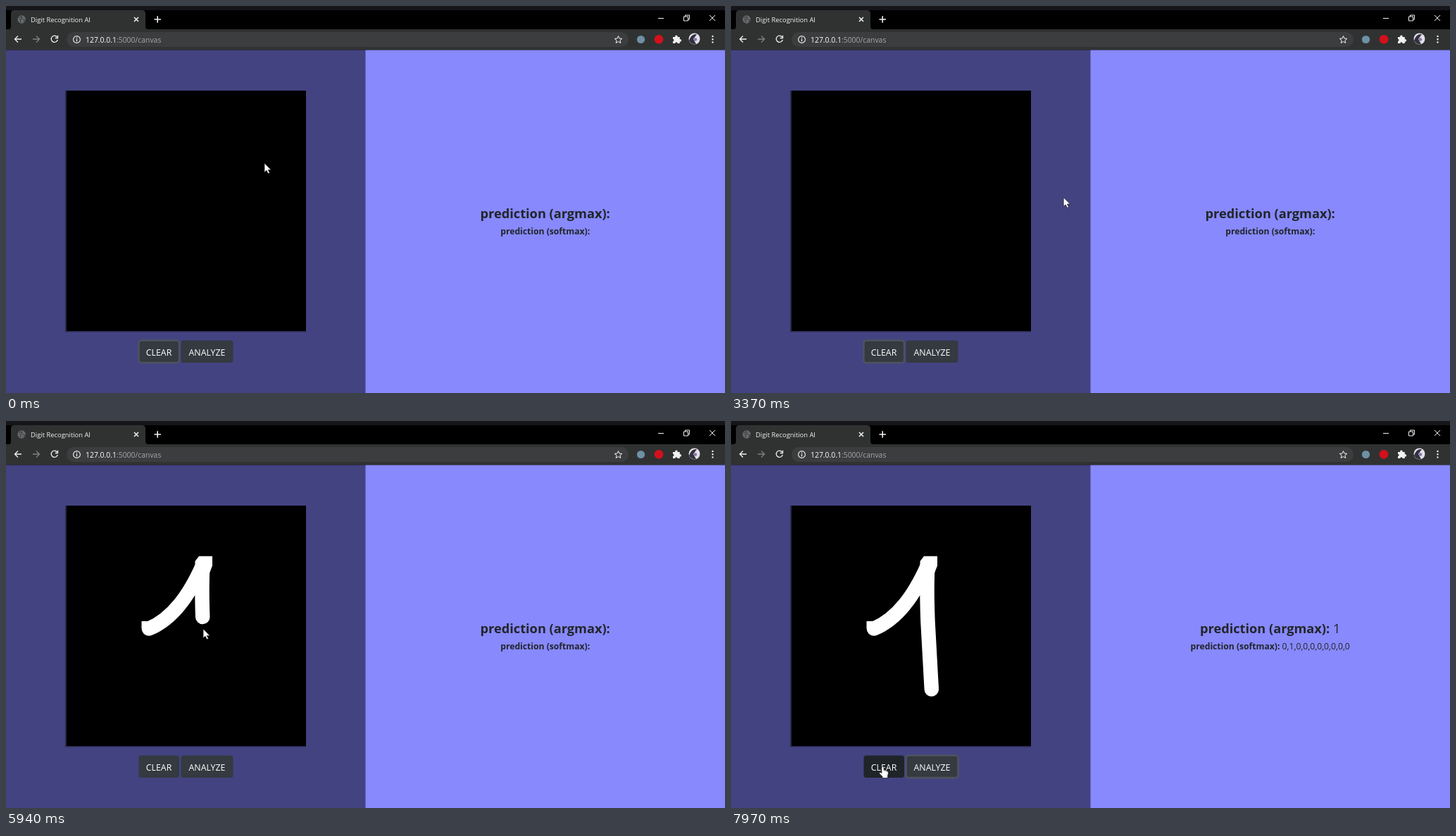
An HTML page for the animation above (8 s loop, 1021 px wide and 549 px high).

```html
<!DOCTYPE html>
<html lang="en">
<head>
<meta charset="utf-8">
<title>Digit Recognition AI</title>
<style>
  html, body { margin: 0; width: 100%; height: 100%; overflow: hidden; background: #434382; }
  svg { display: block; font-family: "Open Sans", "Noto Sans", sans-serif; }
  .icon { fill: none; stroke: #f1f1f1; stroke-width: 1.3; }
  .dim { stroke: #7d8083; }
  .ink { fill: none; stroke: #fff; stroke-width: 20.5; stroke-linecap: round; stroke-linejoin: round; }
  .button rect { fill: #343a40; stroke: #52585d; stroke-opacity: 0; stroke-width: 2.5; }
  .button.hover rect { fill: #1f2428; }
  .button.focus rect { stroke-opacity: .85; }
  .button text { fill: #fff; font-size: 12.4px; text-anchor: middle; }
  .result { fill: #212529; font-weight: 700; text-anchor: middle; }
  .result tspan { font-weight: 400; }
</style>
</head>
<body>
<svg width="1021" height="549" viewBox="0 0 1021 549">
  <!-- Window frame and toolbar -->
  <rect width="1021" height="63" fill="#000"/>
  <rect width="1021" height="6" fill="#15151a"/>
  <path d="M4 33Q7 33 7 29V11Q7 6 12 6H193Q198 6 198 11V29Q198 33 202 33Z" fill="#303232"/>
  <rect y="33" width="1021" height="29.5" fill="#303232"/>
  <rect x="86" y="37" width="798" height="21" rx="10.5" fill="#3b3d3e"/>
  <circle cx="22.2" cy="19" r="5.7" fill="#686b6d"/>
  <path d="M18 17l4-2 1 3-3 1 1 4M24 19l3 1-2 3" class="icon" style="stroke:#404344"/>
  <text x="35" y="22.5" font-size="9.4" fill="#f1f1f1">Digit Recognition AI</text>
  <text x="113" y="51.6" font-size="10.4" fill="#fff">127.0.0.1<tspan fill="#a5a8aa">:5000/canvas</tspan></text>
  <g class="icon">
    <path d="M182 16l6 6m0-6l-6 6M210.500 19h9.500M215.200 14.300v9.500" stroke-width="1.600"/>
    <path d="M926 17.500h8M999 13l8 8m0-8l-8 8M962.500 15h6v6h-6ZM964.500 15v-2h6v6h-2" stroke-width="1"/>
    <path d="M22 47H12.500M17 42.500L12.500 47l4.500 4.500"/>
    <path d="M38 47h9.500M43 42.500l4.500 4.500-4.500 4.500" class="dim"/>
    <path d="M72.500 44A4.600 4.600 0 1 0 73.300 48M73.500 41.800v3.700h-3.700"/>
    <circle cx="100.500" cy="47.500" r="4.900" stroke-width="1.100"/>
    <path d="M100.500 46.800v3.400M100.500 44.500v1.200"/>
    <path d="M869.500 42.500l1.500 3.500 3.800.3-2.900 2.500.9 3.700-3.300-2-3.300 2 .9-3.700-2.900-2.500 3.800-.3Z" stroke-width="1"/>
  </g>
  <circle cx="901.500" cy="47.500" r="5.600" fill="#6e91a6"/>
  <circle cx="927" cy="47.300" r="6.300" fill="#d4101c"/>
  <path d="M947 44h3.200a1.800 1.800 0 1 1 3.400 0h3.200v3.200a1.800 1.800 0 1 1 0 3.400v2.400h-3.200a1.600 1.600 0 1 0-3.400 0H947v-3.100a1.600 1.600 0 1 0 0-3.200Z" fill="#f1f1f1"/>
  <circle cx="977.500" cy="46.500" r="8" fill="#e2e0e8"/>
  <path d="M970 49Q973 39 981 40L976 47 980 54Q972 55 970 49Z" fill="#33303f"/>
  <circle cx="979" cy="47.500" r="2.200" fill="#8774a8"/>
  <path d="M1003.500 43v.01M1003.500 47.200v.01M1003.500 51.400v.01" class="icon" stroke-linecap="round" style="stroke-width:2.400"/>

  <!-- Page -->
  <rect y="62.500" width="510.500" height="487" fill="#434382"/>
  <rect x="510.500" y="62.500" width="511" height="487" fill="#8789fd"/>
  <rect x="84" y="120" width="342" height="342.500" fill="#29294f"/>
  <rect x="86" y="120" width="340" height="341" fill="#000"/>
  <g id="flick">
    <path d="M192.500 284h10v10h-10Z" fill="#fff"/>
    <path id="rise" class="ink" pathLength="1" d="M203 294.500Q248 276 279.500 204"/>
  </g>
  <g id="stem">
    <path d="M268.500 204v-5l5.500-7.200h19v13.500l-5 13Z" fill="#fff"/>
    <path id="fall" class="ink" pathLength="1" d="M279.500 204Q277.500 235 279.500 285L284.800 380.500"/>
  </g>
  <g id="clear" class="button">
    <rect x="188.500" y="474.500" width="57.500" height="31.500" rx="3.500"/>
    <text x="217" y="495.600">CLEAR</text>
  </g>
  <g id="analyze" class="button">
    <rect x="248.500" y="474.500" width="74" height="31.500" rx="3.500"/>
    <text x="285.500" y="495.600">ANALYZE</text>
  </g>
  <text class="result" x="765.700" y="300.500" font-size="18.200">prediction (argmax): <tspan id="argmax"></tspan></text>
  <text class="result" x="765.700" y="323.700" font-size="12.150">prediction (softmax): <tspan id="softmax"></tspan></text>

  <g id="cursor" fill="#fff" stroke="#16161c" stroke-width=".7" stroke-linejoin="round">
    <path id="arrow" d="M0 0V13L3 10.300 5.200 14.800 7.400 13.800 5.300 9.500H9.400Z"/>
    <path id="hand" d="M-1.600 1.200Q0-1 1.600 1.200V5.500L6 6.500Q8 7 8 9L7 13.500V16.500H-.5V14.500L-4.800 10Q-5 7.800-3 8.500L-1.600 9.800Z"/>
  </g>
</svg>
<script>
  const $ = id => document.getElementById(id);
  const LOOP = 8000, INK_LAG = 70, SHOW_RESULT = 7270, CLICK = 7200;
  const RISE = [5080, 5500], FALL = [5560, 6300];
  const clamp = v => Math.max(0, Math.min(1, v));
  const progress = (t, [from, to]) => clamp((t - from) / (to - from));

  // Pointer stops: time, x, y
  const stops = [
    [0, 367, 223], [2950, 367, 223], [3750, 562, 313], [4080, 562, 313],
    [4750, 207, 300], [4960, 207, 300], [5080, 203, 294.5],
    [6300, 284.8, 380.5], [6450, 286, 388], [6850, 293.5, 494],
    [7400, 293.5, 494], [7800, 215.5, 490], [8000, 215.5, 490]
  ];

  function along(path, p) {
    const point = path.getPointAtLength(path.getTotalLength() * p);
    return [point.x, point.y];
  }

  function pointer(t) {
    if (t >= RISE[0] && t < FALL[0]) return along($('rise'), progress(t, RISE));
    if (t >= FALL[0] && t < FALL[1]) return along($('fall'), progress(t, FALL));
    const i = stops.findIndex(s => s[0] > t);
    const [t0, x0, y0] = stops[i - 1], [t1, x1, y1] = stops[i];
    const p = progress(t, [t0, t1]), e = p * p * (3 - 2 * p);
    return [x0 + (x1 - x0) * e, y0 + (y1 - y0) * e];
  }

  function drawInk(group, path, t, span) {
    $(group).style.display = t < span[0] ? 'none' : '';
    $(path).setAttribute('stroke-dasharray', progress(t, span) + ' 2');
  }

  function drawButton(id, hover, focus) {
    $(id).classList.toggle('hover', hover);
    $(id).classList.toggle('focus', focus);
  }

  function draw(t) {
    const [x, y] = pointer(t);
    const overRow = y > 474 && y < 506;
    const overClear = overRow && x > 188 && x < 246;
    const overAnalyze = overRow && x > 248 && x < 322;
    const overButton = overClear || overAnalyze;

    drawInk('flick', 'rise', t - INK_LAG, RISE);
    drawInk('stem', 'fall', t - INK_LAG, FALL);
    drawButton('clear', overClear, t < RISE[0]);
    drawButton('analyze', overAnalyze, t >= CLICK);

    const done = t >= SHOW_RESULT;
    $('argmax').textContent = done ? '1' : '';
    $('softmax').textContent = done ? '0,1,0,0,0,0,0,0,0,0' : '';

    $('cursor').setAttribute('transform', `translate(${x} ${y})`);
    $('arrow').style.display = overButton ? 'none' : '';
    $('hand').style.display = overButton ? '' : 'none';
  }

  const start = performance.now();
  function tick() {
    draw((performance.now() - start) % LOOP);
    requestAnimationFrame(tick);
  }
  tick();
</script>
</body>
</html>
```
